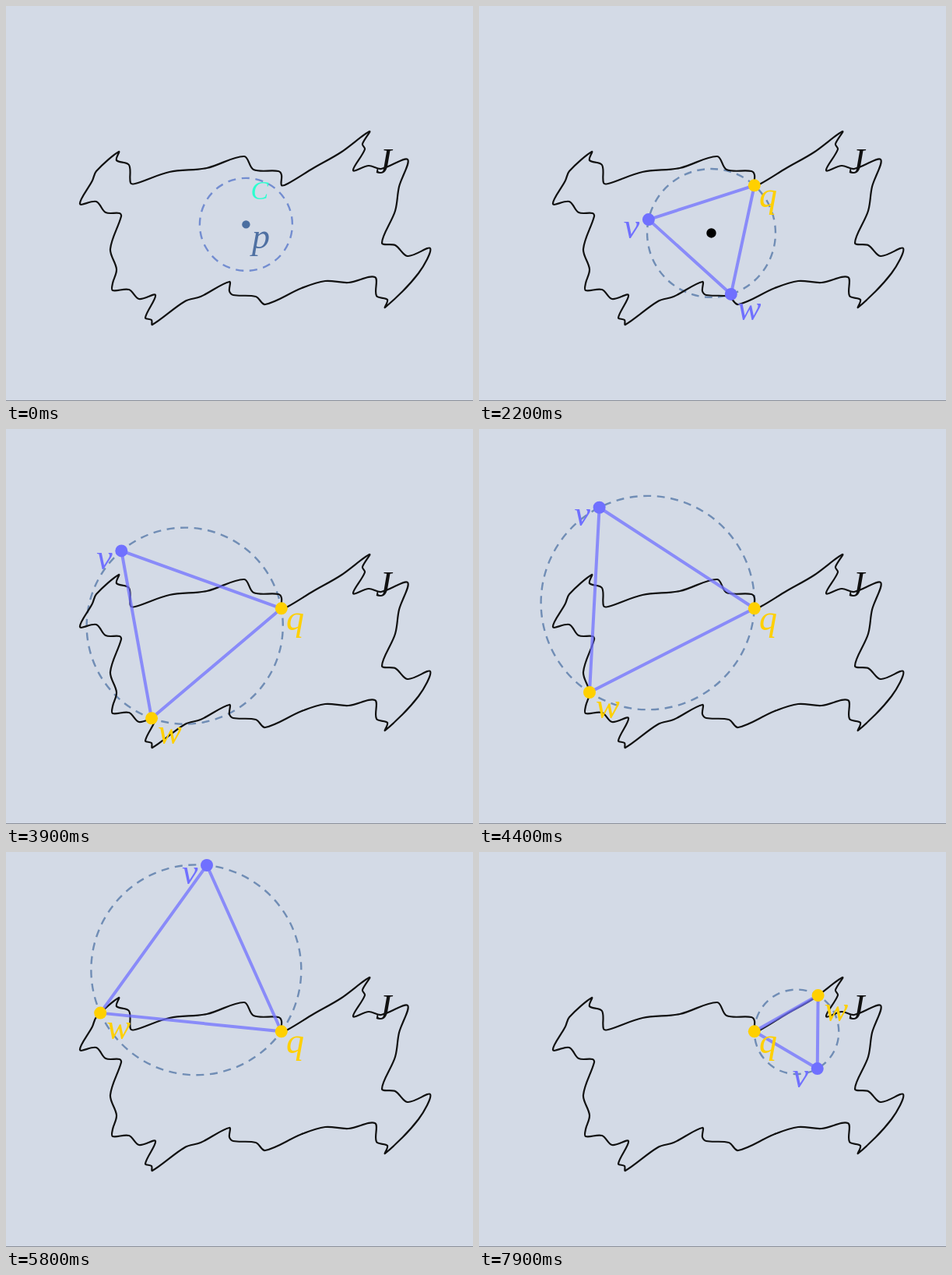
Animation, 600 px wide and 507 px high, one loop 8000 ms. Source, as an HTML page:

```html
<!DOCTYPE html>
<html lang="en">
<head>
<meta charset="utf-8">
<title>Equilateral triangle on a closed curve</title>
<style>
  html, body { margin: 0; width: 100%; height: 100%; overflow: hidden; background: #d3dae6; }
  svg { display: block; width: 100vw; height: 100vh; }
  text { font: italic 46px "Liberation Serif", "Noto Serif", serif; }
  .edge { fill: none; stroke: #7070ff; stroke-width: 4; stroke-opacity: .75; stroke-linejoin: round; }
</style>
</head>
<body>
<svg viewBox="0 0 600 507">
  <rect y="506" width="600" height="1" fill="#8b8f98"/>
  <circle id="ring" fill="none" stroke-width="2.4"/>
  <path id="curve" fill="none" stroke="#111" stroke-width="2.2" stroke-linejoin="round"/>
  <circle id="center"/>
  <text id="pLabel" x="316" y="311" fill="#4f70a2">p</text>
  <text id="cLabel" fill="#2cffd0" style="font-size:34px">C</text>
  <g id="triangle">
    <path id="edges" class="edge"/>
    <circle id="vDot" r="8" fill="#7070ff"/>
    <text id="vLabel" fill="#7070ff">v</text>
    <circle id="wDot" r="8"/>
    <text id="wLabel">w</text>
  </g>
  <g id="anchor" fill="#ffd000">
    <circle cx="353.8" cy="230.3" r="8"/>
    <text x="360" y="258">q</text>
  </g>
  <text x="475" y="215" fill="#111">J</text>
</svg>
<script>
const LOOP = 8000, STEP = 100;
const TOUCH = 400, GROW = 1000, CONTACT = 2400;
const Q = [353.8, 230.3], P = [308.4, 280.4], W_START = [329, 345.3];

const outline = `333,383 321,373 292,371 287,366 287,354 250,373 230,379 188,409 187,403
  179,400 192,371 171,376 158,364 137,365 137,356 142,338 134,312 148,270 146,266 128,265 116,251
  95,254 111,224 116,212 145,187 142,198 158,204 160,227 166,228 210,213 258,208 306,193
  318,210 350,212 354,217 354,230 362,228 395,208 430,188 467,161 458,177 461,184 446,211
  466,205 482,209 516,197 505,232 500,263 483,304 500,307 516,321 545,311 530,343 487,387
  490,377 476,372 474,348 440,355 410,353 380,362`
  .trim().split(/\s+/).map(pair => pair.split(',').map(Number));

// time, x, y of w along the curve
const stops = [
  [CONTACT, 323, 374], [3000, 243, 375], [3900, 187, 371], [4800, 148, 275],
  [5000, 131, 267], [5700, 118, 210], [5800, 121, 207], [6600, 225, 211],
  [7500, 353, 214], [7600, 354, 229], [7900, 435, 184]
];

const $ = id => document.getElementById(id);
const clamp = x => Math.max(0, Math.min(1, x));
const ramp = (t, from, to) => clamp((t - from) / (to - from));
const mix = (a, b, k) => a + (b - a) * k;
const mixPoint = (a, b, k) => [mix(a[0], b[0], k), mix(a[1], b[1], k)];
const dist = (a, b) => Math.hypot(a[0] - b[0], a[1] - b[1]);
const blend = (a, b, k) => `rgb(${a.map((c, i) => Math.round(mix(c, b[i], k)))})`;

function set(id, attrs) {
  for (const name in attrs) $(id).setAttribute(name, attrs[name]);
}

// Closed smooth path whose handles shrink at sharp turns.
function smoothPath(pts) {
  const at = i => pts[(i + pts.length) % pts.length];
  const handle = (i, length) => {
    const [a, b, c] = [at(i - 1), at(i), at(i + 1)];
    const k = length / (dist(a, b) + dist(b, c)) / 3;
    return [b[0] + (c[0] - a[0]) * k, b[1] + (c[1] - a[1]) * k];
  };
  let d = 'M' + pts[0];
  pts.forEach((p, i) => {
    const length = dist(p, at(i + 1));
    d += `C${handle(i, length)} ${handle(i + 1, -length)} ${at(i + 1)}`;
  });
  return d + 'Z';
}

set('curve', { d: smoothPath(outline) });
const curve = $('curve');
const pointAt = s => { const p = curve.getPointAtLength(s); return [p.x, p.y]; };
const samples = Array.from({ length: Math.floor(curve.getTotalLength()) }, (_, s) => pointAt(s));

function lengthAt(point) {
  let best = 0;
  samples.forEach((p, s) => { if (dist(p, point) < dist(samples[best], point)) best = s; });
  return best;
}

const track = stops.map(([t, x, y]) => [t, lengthAt([x, y])]);
const contactPoint = pointAt(track[0][1]);

function wAt(t) {
  if (t < CONTACT) return mixPoint(W_START, contactPoint, ramp(t, GROW, CONTACT));
  let i = 0;
  while (i < track.length - 2 && t >= track[i + 1][0]) i++;
  const [from, to] = [track[i], track[i + 1]];
  return pointAt(mix(from[1], to[1], ramp(t, from[0], to[0])));
}

function turnAroundQ([x, y]) {
  const dx = x - Q[0], dy = y - Q[1], h = Math.sqrt(3) / 2;
  return [Q[0] + dx / 2 - dy * h, Q[1] + dx * h + dy / 2];
}

function draw(t) {
  const w = wAt(t), v = turnAroundQ(w);
  const growing = t >= GROW;
  const c = growing ? [0, 1].map(i => (Q[i] + w[i] + v[i]) / 3) : P;
  const r = growing ? dist(w, Q) / Math.sqrt(3)
    : 59.5 + 2.5 * ramp(t, 0, 200) + 6 * ramp(t, TOUCH, 800);
  const change = ramp(t, TOUCH, 800);
  const dashes = Math.max(1, Math.round(2 * Math.PI * r / 17.5));

  set('ring', {
    r, transform: `translate(${c}) scale(1 -1)`,
    pathLength: dashes, 'stroke-dasharray': '.57 .43',
    stroke: blend([115, 141, 208], [112, 141, 181], change)
  });
  set('center', {
    cx: c[0], cy: c[1], r: mix(5.2, 6.2, change),
    fill: blend([74, 110, 160], [0, 0, 0], change),
    opacity: 1 - ramp(t, CONTACT - 200, CONTACT)
  });
  set('pLabel', { opacity: 1 - change });

  const shift = ramp(t, TOUCH, 1200);
  set('cLabel', {
    x: c[0] + mix(6, -31, shift), y: c[1] + mix(-32.5, -14, shift),
    opacity: 1 - ramp(t, 1200, 1600)
  });

  set('triangle', { opacity: ramp(t, 700, 1000) });
  set('anchor', { opacity: ramp(t, 500, 800) });
  set('edges', { d: `M${Q}L${w}L${v}Z` });
  set('vDot', { cx: v[0], cy: v[1] });
  set('vLabel', { x: v[0] - 32, y: v[1] + 23.5 });
  const wColor = t < CONTACT ? '#7070ff' : '#ffd000';
  set('wDot', { cx: w[0], cy: w[1], fill: wColor });
  set('wLabel', { x: w[0] + 8, y: w[1] + 33, fill: wColor });
}

const start = performance.now();
function tick() {
  const t = (performance.now() - start) % LOOP;
  draw(Math.floor(t / STEP) * STEP);
  requestAnimationFrame(tick);
}
tick();
</script>
</body>
</html>
```
